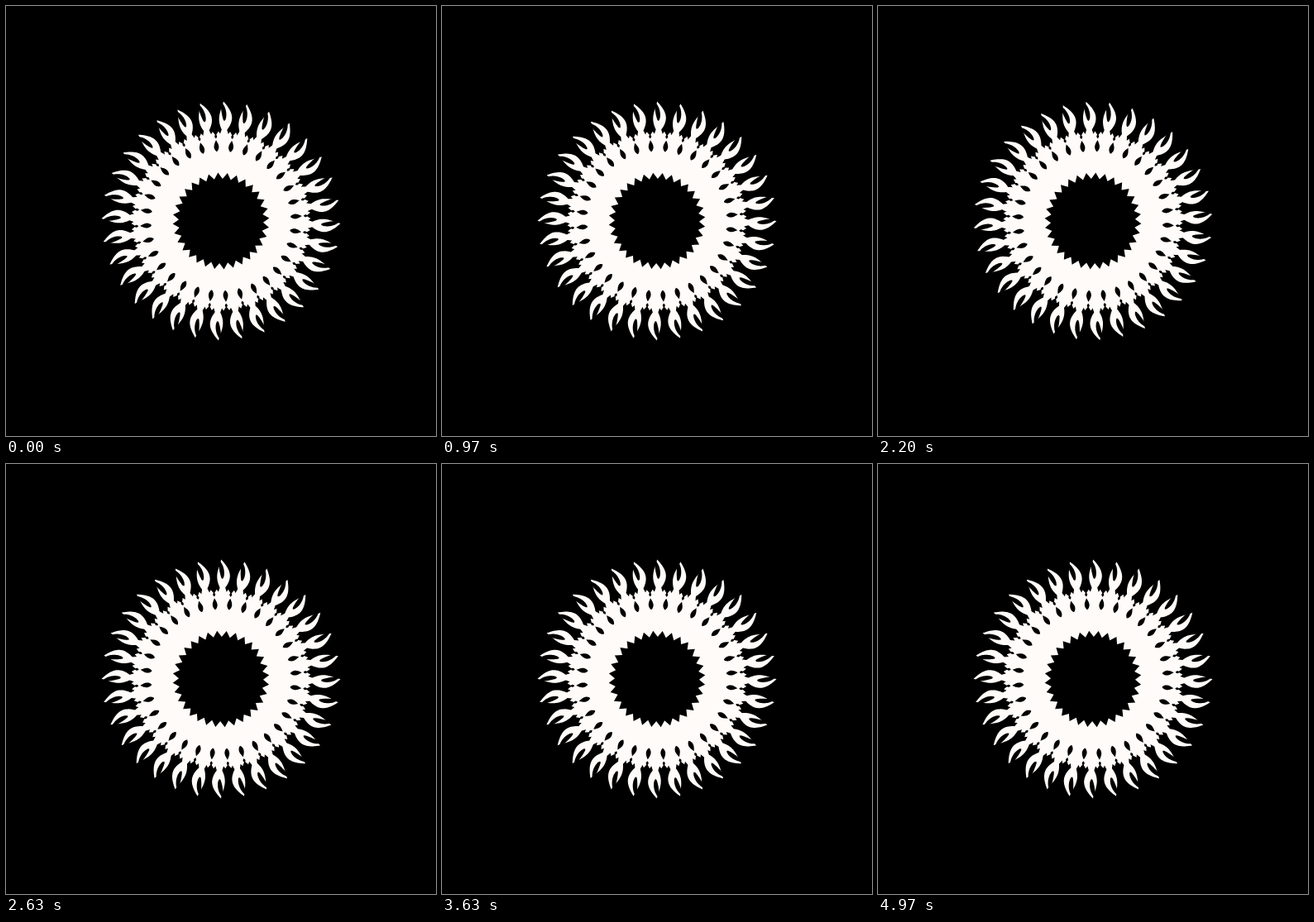
Recreate the animation shown at these times as an HTML page with a canvas. Size 520x520 px, loop 5.01 s.

```html
<!DOCTYPE html>
<html lang="en">
<head>
<meta charset="utf-8">
<title>Turning flame ring</title>
<style>
html, body { margin: 0; width: 100%; height: 100%; overflow: hidden; background: #000; }
canvas { display: block; width: 520px; height: 520px; }
</style>
</head>
<body>
<canvas id="stage" width="520" height="520"></canvas>
<script>
const ctx = document.getElementById('stage').getContext('2d');
const LOOP = 5010, FPS = 30, FRAMES = 150;
const TURN = Math.PI * 2, COUNT = 32, STEP = TURN / COUNT;
const STEPS_PER_PETAL = 10, START = TURN * 2.1 / 360;
const WHITE = '#fffbf8', BLACK = '#000';

// Disc whose edge is a triangle wave, highest at angle 0 (straight up).
function jagged(color, low, high, teeth) {
  ctx.fillStyle = color;
  ctx.beginPath();
  for (let i = 0; i < teeth * 2; i++) {
    const a = i / teeth / 2 * TURN, r = i % 2 ? low : high;
    ctx.lineTo(r * Math.sin(a), -r * Math.cos(a));
  }
  ctx.fill();
}

// Upright ribbon from radius r0 to r1, given its middle line and half width.
function ribbon(color, r0, r1, middle, half) {
  const n = 20;
  ctx.fillStyle = color;
  ctx.beginPath();
  for (let i = 0; i <= n * 2 + 1; i++) {
    const left = i <= n, u = (left ? i : n * 2 + 1 - i) / n;
    const x = middle(u) + (left ? -1 : 1) * half(u);
    ctx.lineTo(x, -(r0 + (r1 - r0) * u));
  }
  ctx.fill();
}

function eachSector(offset, draw) {
  for (let i = 0; i < COUNT; i++) {
    ctx.save();
    ctx.rotate((i + offset) * STEP);
    draw();
    ctx.restore();
  }
}

const straight = () => 0;
const bulge = u => Math.sin(Math.PI * u);

function petal() {
  ribbon(WHITE, 102, 112, straight, u => 6 - 3.2 * u);
  ribbon(WHITE, 110, 144.5, u => 3.2 * u - 5.5 * u ** 3,
    u => 2.8 * (1 - u) + 6.2 * bulge(u ** 0.9));
  ribbon(BLACK, 121, 143, u => -0.4 - 4.2 * u * u,
    u => 2.8 * Math.sqrt(bulge(u)));
}

function gap() {
  ribbon(BLACK, 84, 98, straight, u => 2.9 * bulge(u ** 0.8));
  ribbon(BLACK, 100, 105, straight, u => 1.5 * bulge(u));
}

function draw(time) {
  const ms = Math.floor((time % LOOP) / 10) * 10;
  const tick = Math.min(FRAMES - 1, Math.floor((ms + 4) * FPS / 1000));
  ctx.setTransform(1, 0, 0, 1, 0, 0);
  ctx.fillStyle = BLACK;
  ctx.fillRect(0, 0, 520, 520);
  ctx.translate(260, 260);
  ctx.rotate(START + tick * STEP / STEPS_PER_PETAL);
  jagged(WHITE, 103.5, 108.5, COUNT * 3);
  eachSector(0, petal);
  eachSector(0.5, gap);
  ctx.rotate(STEP / 2);
  jagged(BLACK, 51, 58.5, COUNT);
}

let begin;
function loop(now) {
  if (begin === undefined) begin = now;
  draw(now - begin);
  requestAnimationFrame(loop);
}
draw(0);
requestAnimationFrame(loop);
</script>
</body>
</html>
```
